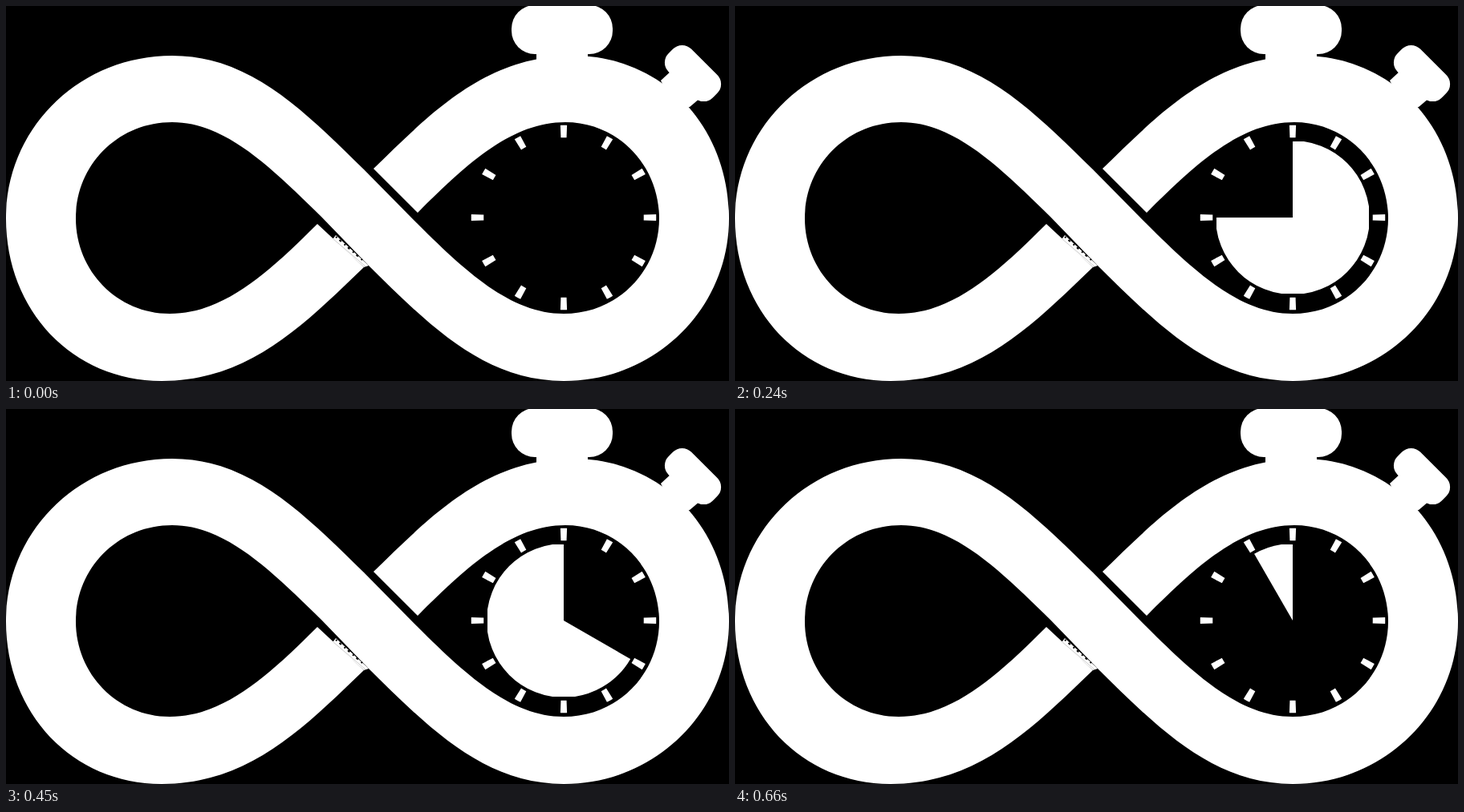
Animation of 901 by 468 pixels, one loop 0.69 s. Source, as an HTML page:

```html
<!DOCTYPE html>
<html lang="en">
<head>
<meta charset="utf-8">
<title>Infinite stopwatch</title>
<style>
  html, body { margin: 0; width: 100%; height: 100%; overflow: hidden; background: #000; }
  svg { display: block; }
</style>
</head>
<body>
<svg width="901" height="468" viewBox="0 0 901 468" fill="#fff">
  <clipPath id="face"><rect x="-95" y="-95" width="190" height="190"/></clipPath>

  <!-- left loop with the long diagonal band, closed by the right loop -->
  <path d="M388 272 C325 335 270 384 204 384 C139 384 87 331 87 265 C87 198 140 145 207 145
    C272 145 327 198 393 263 L449 321 C525 396 594 468 695 468 C809 468 901 378 901 265
    C901 150 818 62 707 62 C598 62 530 133 458 203 L513 258 C576 195 631 145 697 145
    C762 145 814 198 814 265 C814 331 762 384 695 384 C629 384 573 332 508 267 L446 204
    C372 132 305 62 207 62 C92 62 0 152 0 265 C0 380 83 468 194 468 C303 468 371 398 446 326 Z"/>
  <path d="M407 291L411 286L452 324L446 326Z"/>
  <path d="M408 291L448 325" stroke="#ccc"/>
  <path d="M411 288L444 317" stroke="#000" stroke-width="2" stroke-dasharray="2 4 3 5"/>

  <!-- crown and side button -->
  <rect x="630" y="-1" width="126" height="61" rx="29"/>
  <rect x="661" y="58" width="64" height="14"/>
  <rect x="-39" y="-20" width="78" height="40" rx="16" transform="translate(856 84) rotate(45)"/>
  <path d="M816 93L829 81L865 115L852 126L835 130Z"/>

  <g transform="translate(695 264) rotate(-90)" fill="none" stroke="#fff">
    <circle r="107.5" stroke-width="15.5" pathLength="360" stroke-dasharray="4.2 25.8" stroke-dashoffset="2.1"/>
    <circle id="pie" r="48" stroke-width="96" pathLength="12" clip-path="url(#face)"/>
  </g>
</svg>
<script>
  const FRAME = 30, FRAMES = 23, HOURS = 12;
  const pie = document.getElementById('pie');

  function draw(now) {
    const frame = Math.floor(now / FRAME) % FRAMES;
    const hour = frame > 4 ? frame + 1 : frame; // the sweep skips one hour
    const gone = hour - HOURS;
    pie.setAttribute('stroke-dasharray',
      gone <= 0 ? `${hour} 24` : `0 ${gone} ${HOURS - gone} 24`);
    pie.style.visibility = hour ? 'visible' : 'hidden';
  }

  const start = performance.now();
  function tick() {
    draw(performance.now() - start);
    requestAnimationFrame(tick);
  }
  tick();
</script>
</body>
</html>
```
